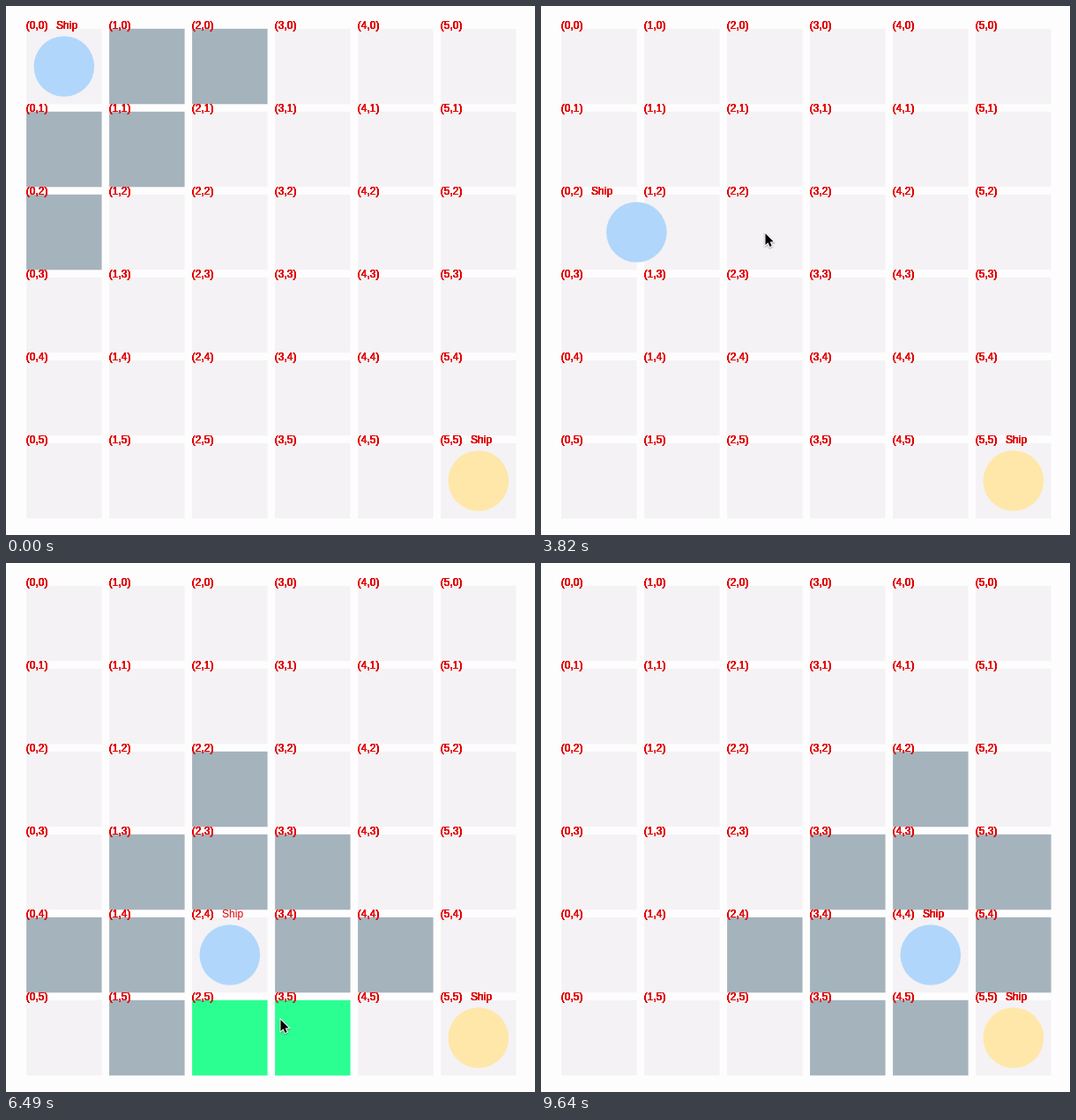
An HTML page with a canvas that plays this animation: 600 by 600 pixels, repeating every 9670 ms.

```html
<!DOCTYPE html>
<html lang="en">
<head>
<meta charset="utf-8">
<title>Grid ship</title>
<style>
  html, body { margin: 0; width: 100%; height: 100%; overflow: hidden; background: #fefdfe; }
  canvas { display: block; width: 600px; height: 600px; }
</style>
</head>
<body>
<canvas id="stage"></canvas>
<script>
const LOOP = 9670;
const N = 6, PITCH = 94, SIZE = 85.5, LEFT = 23.1, TOP = 25.8;
const MOVE = 800, HOVER_LAG = 60, REACH = 2;
const COLORS = {
  back: '#fefdfe', cell: '#f4f2f5', range: '#a5b3bc', path: '#2bff91',
  ship: '#b0d6fb', rival: '#fee7a8', text: '#e00000'
};

const rival = { c: 5, r: 5 };
// Time of each click and the cell the ship leaves for.
const stops = [
  { at: -MOVE, c: 0, r: 0 },
  { at: 1450, c: 0, r: 2 },
  { at: 3640, c: 2, r: 2 },
  { at: 5608, c: 2, r: 4 },
  { at: 7850, c: 4, r: 4 }
];
// Pointer: time, x, y
const track = [
  [640, 240, 400], [1040, 69, 253], [2480, 69, 253], [3150, 254, 257],
  [4250, 254, 257], [4520, 286, 257], [4700, 290, 262], [5250, 256, 440],
  [5620, 256, 440], [5870, 311, 517], [6880, 311, 517], [7350, 427, 440],
  [8750, 427, 440], [9150, 470, 500]
];

const canvas = document.getElementById('stage');
const dpr = window.devicePixelRatio || 1;
canvas.width = canvas.height = 600 * dpr;
const ctx = canvas.getContext('2d');
ctx.scale(dpr, dpr);

const cellX = c => LEFT + c * PITCH;
const cellY = r => TOP + r * PITCH;
const same = (a, b) => a.c === b.c && a.r === b.r;
const mix = (a, b, k) => a + (b - a) * k;

function pointerAt(t) {
  const i = track.findIndex(p => p[0] > t);
  if (i < 1) return null;
  const [t0, x0, y0] = track[i - 1], [t1, x1, y1] = track[i];
  const k = (t - t0) / (t1 - t0), e = k * k * (3 - 2 * k);
  return { x: mix(x0, x1, e), y: mix(y0, y1, e) };
}

function shipAt(t) {
  let i = stops.length - 1;
  while (stops[i].at > t) i--;
  const to = stops[i], from = stops[i - 1] || to;
  const k = Math.min(1, (t - to.at) / MOVE);
  return {
    c: mix(from.c, to.c, k), r: mix(from.r, to.r, k),
    home: k < 1 ? from : to,
    moving: k < 1,
    rested: i === 0 || k < 1 ? Infinity : t - to.at - MOVE
  };
}

function inRange(cell, home) {
  const d = Math.abs(cell.c - home.c) + Math.abs(cell.r - home.r);
  return d > 0 && d <= REACH && !same(cell, rival);
}

function hoveredCell(t) {
  const p = pointerAt(t - HOVER_LAG);
  if (!p) return null;
  const c = Math.floor((p.x - LEFT) / PITCH), r = Math.floor((p.y - TOP) / PITCH);
  const inside = p.x - cellX(c) <= SIZE && p.y - cellY(r) <= SIZE;
  return inside ? { c, r } : null;
}

function route(from, to) {
  const steps = [];
  let { c, r } = from;
  while (c !== to.c || r !== to.r) {
    if (r !== to.r) r += Math.sign(to.r - r);
    else c += Math.sign(to.c - c);
    steps.push({ c, r });
  }
  return steps;
}

function label(text, x, y, layers) {
  for (let i = 0; i < layers; i++) ctx.fillText(text, x, y);
}

function disc(c, r, color) {
  ctx.fillStyle = color;
  ctx.beginPath();
  ctx.arc(cellX(c) + SIZE / 2, cellY(r) + SIZE / 2, 34.3, 0, Math.PI * 2);
  ctx.fill();
}

function drawPointer({ x, y }) {
  const shape = [[0, 0], [0, 13], [3, 10.3], [5, 15], [7.2, 14], [5.2, 9.4], [9.2, 9.2]];
  ctx.save();
  ctx.translate(x + 0.5, y + 1);
  ctx.beginPath();
  shape.forEach(([px, py]) => ctx.lineTo(px, py));
  ctx.closePath();
  ctx.lineWidth = 2;
  ctx.strokeStyle = '#fff';
  ctx.shadowColor = 'rgba(0,0,0,0.35)';
  ctx.shadowBlur = 2 * dpr;
  ctx.shadowOffsetY = dpr;
  ctx.stroke();
  ctx.shadowColor = 'transparent';
  ctx.fillStyle = '#000';
  ctx.fill();
  ctx.restore();
}

function draw(t) {
  const ship = shipAt(t), hover = hoveredCell(t), pointer = pointerAt(t);
  const path = !ship.moving && hover && inRange(hover, ship.home) ? route(ship.home, hover) : [];

  ctx.fillStyle = COLORS.back;
  ctx.fillRect(0, 0, 600, 600);
  ctx.font = '12px "Liberation Sans", Arial, sans-serif';

  for (let r = 0; r < N; r++) {
    for (let c = 0; c < N; c++) {
      const cell = { c, r }, x = cellX(c), y = cellY(r);
      ctx.fillStyle = path.some(p => same(p, cell)) ? COLORS.path
        : !ship.moving && inRange(cell, ship.home) ? COLORS.range : COLORS.cell;
      ctx.fillRect(x, y, SIZE, SIZE);

      // Repeated drawing thickens the soft edges of the letters.
      ctx.fillStyle = COLORS.text;
      label(`(${c},${r})`, x - 0.3, y - 0.1, 8);
      const mine = same(cell, ship.home);
      if (mine || same(cell, rival)) {
        const layers = mine ? Math.min(8, 1 + Math.floor(ship.rested / 130)) : 8;
        label('Ship', x + 34, y - 0.1, layers);
      }
    }
  }

  disc(rival.c, rival.r, COLORS.rival);
  disc(ship.c, ship.r, COLORS.ship);
  if (pointer) drawPointer(pointer);
}

const start = performance.now();
function tick() {
  draw((performance.now() - start) % LOOP);
  requestAnimationFrame(tick);
}
tick();
</script>
</body>
</html>
```
